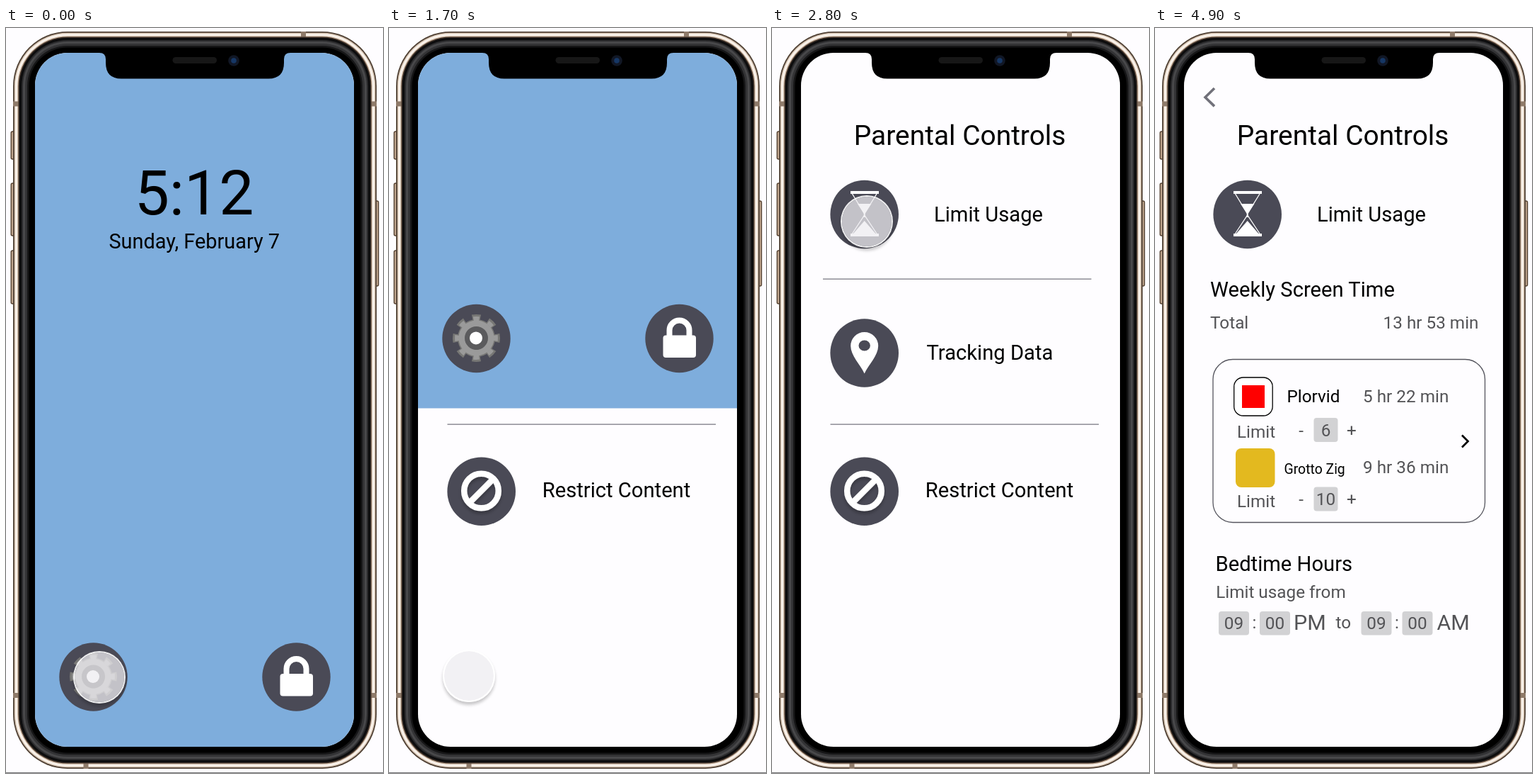
These frames come from a looping animation (533x1051 px, 5000 ms). An HTML page:

```html
<!DOCTYPE html>
<html lang="en">
<head>
<meta charset="utf-8">
<title>Parental controls</title>
<style>
  html, body { margin: 0; width: 100%; height: 100%; overflow: hidden; background: #fefdff; }
  svg { position: absolute; left: 0; top: 0; }
  text { font-family: Roboto, sans-serif; font-size: 24.3px; fill: #535356; white-space: pre; }
  .title { font-size: 38.9px; fill: #000; }
  .head { font-size: 29.2px; fill: #000; }
  .mid { text-anchor: middle; }
  .disc { fill: #4a4a56; }
  .white { fill: #fff; }
  .line { fill: none; stroke: #fff; }
  .rule { stroke: #777780; stroke-width: 1.3; }
  .box { fill: #d2d2d4; }
  #touch {
    position: absolute; left: -37px; top: -37px; width: 74px; height: 74px;
    box-sizing: border-box; border-radius: 50%;
    border: 2px solid rgba(255, 255, 255, .9);
    background: rgba(238, 237, 240, .74); background-clip: padding-box;
    box-shadow: 0 4px 4px rgba(0, 0, 0, .22);
  }
</style>
</head>
<body>
<svg width="533" height="1051" viewBox="0 0 533 1051">
  <defs>
    <clipPath id="screen"><rect x="41" y="35" width="451" height="979" rx="46"/></clipPath>
    <filter id="drop" x="-30%" y="-30%" width="160%" height="170%">
      <feDropShadow dx="0" dy="4" stdDeviation="2" flood-opacity=".25"/>
    </filter>
    <g id="hourglass">
      <circle class="disc" cx="130.7" cy="263" r="48.3"/>
      <path class="white" d="M111 230h40v4h-40zM111 290h40v4h-40zM121 248h19.4L130.7 263zM115 290L130.7 272 146.4 290z"/>
      <path class="line" stroke-width="1.3" d="M113.5 234L130.7 262 148 234M113.5 290L130.7 264 148 290"/>
      <path class="line" stroke-width="2" d="M130.7 260v7"/>
    </g>
    <g id="heading">
      <text class="title mid" x="265.6" y="165">Parental Controls</text>
      <use href="#hourglass"/>
      <text class="head" x="229" y="273">Limit Usage</text>
    </g>
  </defs>

  <g id="body">
    <g fill="#bfa58e" stroke="#54402f" stroke-width="1.4">
      <rect x="7.2" y="146" width="6" height="39" rx="2"/>
      <rect x="7.2" y="219" width="6" height="74" rx="2"/>
      <rect x="7.2" y="314" width="6" height="75" rx="2"/>
      <rect x="520" y="244" width="6.6" height="120" rx="2"/>
    </g>
  </g>

  <g clip-path="url(#screen)">
    <rect x="41" y="35" width="451" height="979" fill="#fefdff"/>

    <g id="menu">
      <use href="#heading"/>
      <path class="rule" d="M72 354.2H451.500M82.500 559.200H462"/>
      <circle class="disc" cx="130.700" cy="458.500" r="48.300"/>
      <path class="white" fill-rule="evenodd" d="M130.700 487.500C125 475 111.200 462 111.200 448.500a19.500 19.500 0 0 1 39 0C150.200 462 136.400 475 130.700 487.500zM122.500 448a8.200 7.500 0 1 0 16.400 0a8.200 7.500 0 1 0-16.400 0z"/>
      <text class="head" x="218.500" y="468">Tracking Data</text>
      <circle class="disc" cx="130.700" cy="653.700" r="48.300"/>
      <g class="line" stroke-width="8.500" filter="url(#drop)">
        <circle cx="130.500" cy="653" r="24.300"/>
        <path d="M147 636.500L114 669.500"/>
      </g>
      <text class="head" x="216.700" y="662">Restrict Content</text>
    </g>

    <g id="usage">
      <use href="#heading"/>
      <path id="back" d="M84 85L71 97.700 84 110.400" fill="none" stroke-width="3.600"/>
      <text class="head" x="78" y="379">Weekly Screen Time</text>
      <text x="78" y="424">Total</text>
      <text x="457.500" y="424" text-anchor="end">13 hr 53 min</text>
      <rect x="82" y="467.500" width="384.500" height="230" rx="28" fill="none" stroke="#55555e" stroke-width="1.300"/>
      <path d="M434 574.500L442.500 583 434 591.500" fill="none" stroke="#000" stroke-width="2.700"/>

      <rect x="111.700" y="493" width="54.500" height="54" rx="13" fill="#fff" stroke="#000" stroke-width="1.300"/>
      <rect x="123" y="504" width="32" height="32" fill="#f00"/>
      <text x="186.500" y="528" style="fill:#000">Plorvid</text>
      <text x="294" y="528">5 hr 22 min</text>
      <rect x="114" y="593" width="55.500" height="55" rx="8" fill="#e3b91f"/>
      <text x="182.500" y="628.500" style="fill:#000;font-size:19.400px">Grotto Zig</text>
      <text x="294" y="628">9 hr 36 min</text>
      <g id="limits"></g>

      <text class="head" x="85.500" y="766">Bedtime Hours</text>
      <text x="86.200" y="804">Limit usage from</text>
      <g id="hours"></g>
      <text x="255.500" y="847">to</text>
    </g>

    <g id="lock">
      <rect x="41" y="35" width="451" height="979" fill="#7eaddc"/>
      <text class="mid" x="266" y="262.500" style="font-size:87.500px;fill:#000">5:12</text>
      <text class="mid" x="266.200" y="310.500" style="font-size:28.900px;fill:#000">Sunday, February 7</text>
      <circle class="disc" cx="123.500" cy="915.500" r="48.200"/>
      <g fill="none" transform="rotate(-11.250 123.500 915)">
        <circle cx="123.500" cy="915" r="28" pathLength="16" stroke="#777775" stroke-width="11" stroke-dasharray="1"/>
        <circle cx="123.500" cy="915" r="21" stroke="#777775" stroke-width="11"/>
        <circle cx="123.500" cy="915" r="27.500" pathLength="16" stroke="#9a9a9a" stroke-width="6" stroke-dasharray=".75 1.250" stroke-dashoffset="-.125"/>
        <circle cx="123.500" cy="915" r="20.500" stroke="#9a9a9a" stroke-width="9"/>
        <circle cx="123.500" cy="915" r="16.500" fill="#5b5b5d"/>
      </g>
      <circle class="white" cx="123" cy="915" r="9"/>
      <circle class="disc" cx="410.500" cy="915.500" r="48.200"/>
      <rect class="white" x="387.500" y="911" width="46.500" height="31.500" rx="4"/>
      <path class="line" stroke-width="8" d="M396.500 913V904a14 14 0 0 1 28 0V913"/>
    </g>
  </g>

  <path d="M132 34H402V35Q393 35 393 44V49Q393 71.500 371 71.500H163Q141 71.500 141 49V44Q141 35 132 35z"/>
  <rect x="235.500" y="41" width="62.500" height="9" rx="4.500" fill="#171717"/>
  <circle cx="322" cy="46" r="7.800" fill="#111725"/>
  <circle cx="322" cy="46" r="3.800" fill="#163765"/>
  <rect y="1050" width="533" height="1" fill="#77777a"/>
</svg>
<div id="touch"></div>

<script>
const $ = id => document.getElementById(id);
const add = (id, markup) => $(id).insertAdjacentHTML('beforeend', markup);

// Phone shell: nested rounded rectangles from the metal rim inwards
[[0, '#4f4034'], [1.8, '#d9c7b5'], [3.2, '#faf3ec'], [6.2, '#c5ae99'], [7.5, '#3b2e26'],
 [9, '#0c0c0d'], [12, '#2b2b2d'], [14, '#48484a'], [17, '#333335'], [20, '#161617'], [22.5, '#000']]
  .forEach(([inset, color]) => {
    add('body', `<rect x="${10 + inset}" y="${5 + inset}" width="${514 - 2 * inset}"
      height="${1040 - 2 * inset}" rx="${77 - inset}" fill="${color}"/>`);
    if (inset === 6.2) {
      add('body', '<path fill="#8f7b6a" d="M10 103.500h8v7h-8zM516 103.500h8v7h-8zM10 938h8v7h-8zM516 938h8v7h-8zM417 5h7v8h-7zM109.500 1037h7v8h-7z"/>');
    }
  });

const field = (x, y, w, h, value, base) =>
  `<rect class="box" x="${x}" y="${y}" width="${w}" height="${h}" rx="4"/>
   <text class="mid" x="${x + w / 2}" y="${base}">${value}</text>`;

[[0, 6], [97.5, 10]].forEach(([dy, value]) => add('limits',
  `<text x="116" y="${578 + dy}">Limit</text>
   <text class="mid" x="206.500" y="${575.5 + dy}">-</text>
   <text class="mid" x="278" y="${575.5 + dy}">+</text>` +
  field(224.5, 550 + dy, 34, 34, value, 575.5 + dy)));

[[90, 'PM', 196], [291.5, 'AM', 398.5]].forEach(([x, half, hx]) => add('hours',
  field(x, 823, 43, 33.5, '09', 848) + field(x + 58, 823, 43, 33.5, '00', 847.5) +
  `<text class="mid" x="${x + 50.5}" y="847">:</text>
   <text x="${hx}" y="849" style="font-size:30.400px">${half}</text>`));

// Touch path: time, x, y
const path = [
  [0, 132, 916], [700, 122, 915], [1500, 113, 914], [1700, 113, 914], [2300, 176, 699],
  [2800, 134, 273], [3200, 134, 273], [3900, 329, 342], [4200, 325, 340],
  [4600, 88, 92], [4700, 88, 96], [4800, 88, 121], [5000, 88, 121]
];
const clamp = v => Math.min(1, Math.max(0, v));
const easeOut = p => 1 - (1 - p) ** 1.65;
const smooth = p => p * p * (3 - 2 * p);

function touchAt(t) {
  const i = path.findIndex(p => p[0] > t);
  const [t0, x0, y0] = path[i - 1], [t1, x1, y1] = path[i];
  const k = smooth((t - t0) / (t1 - t0));
  return [x0 + (x1 - x0) * k, y0 + (y1 - y0) * k];
}

const start = performance.now();
function draw(now) {
  const t = Math.floor(Math.max(0, now - start) % 5000 / 100) * 100;
  const rise = 979 * easeOut(clamp((t - 1600) / 300));
  $('lock').setAttribute('transform', `translate(0 ${-rise})`);
  $('lock').style.display = t < 1900 ? '' : 'none';
  $('menu').style.display = t < 2900 ? '' : 'none';
  $('usage').style.display = t < 2900 ? 'none' : '';
  $('back').setAttribute('stroke', t < 4900 ? '#000' : '#71717a');
  const [x, y] = touchAt(t);
  $('touch').style.transform = `translate(${x}px, ${y}px)`;
  $('touch').style.display = t < 4900 ? '' : 'none';
  requestAnimationFrame(draw);
}
draw(start);
</script>
</body>
</html>
```
